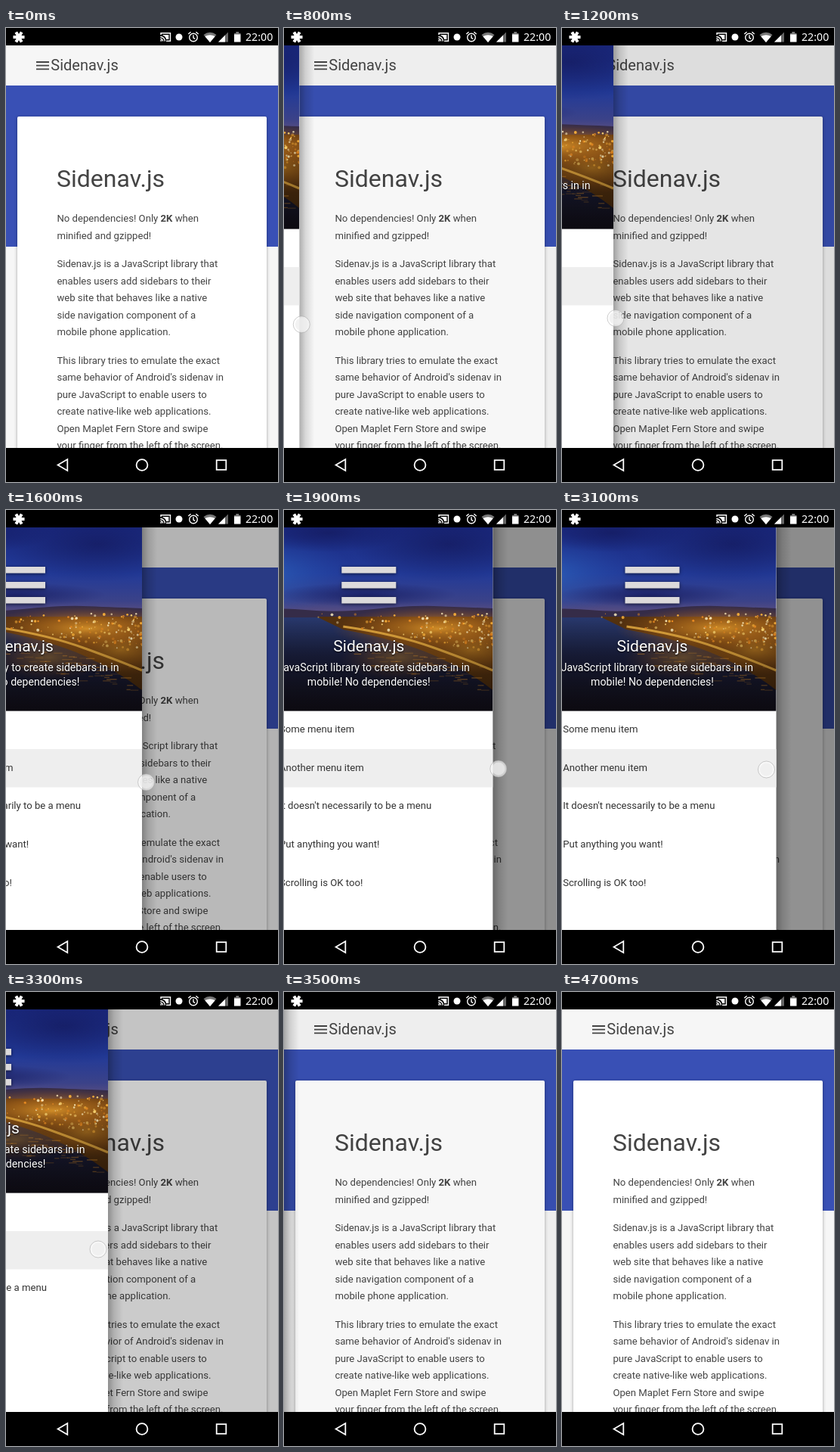
Recreate the animation shown at these times as an HTML page. Size 360 by 600 pixels, loop 5000 ms.

```html
<!DOCTYPE html>
<html lang="en">
<head>
<meta charset="utf-8">
<title>Sidenav.js</title>
<style>
  html, body { margin: 0; width: 100%; height: 100%; overflow: hidden; background: #000; }
  svg { display: block; }
  text { font: 13.15px Roboto, sans-serif; fill: #444; }
  .title { font-size: 20px; }
  .h1 { font-size: 32px; }
  .menu text { fill: #333; }
  .hero text { fill: #fff; font-size: 14.15px; text-anchor: middle; text-shadow: 0 1px 2px rgba(0,0,0,.8); }
  .hero .name { font-size: 21px; }
  .bars { fill: #dcdadb; filter: drop-shadow(0 1px 2px rgba(0,0,0,.6)); }
  .clock { font: 500 14.2px "Noto Sans", "Open Sans", sans-serif; fill: #fff; }
  .line { fill: none; stroke: #fff; }
</style>
</head>
<body>
<svg width="360" height="600" viewBox="0 0 360 600">
  <defs>
    <linearGradient id="sky" x1="0" y1="0" x2="0" y2="1">
      <stop offset="0" stop-color="#1a2a82"/>
      <stop offset=".5" stop-color="#223a98"/>
      <stop offset=".8" stop-color="#3b4288"/>
      <stop offset="1" stop-color="#6d567c"/>
    </linearGradient>
    <radialGradient id="glow">
      <stop offset="0" stop-color="#2f6cc4" stop-opacity=".75"/>
      <stop offset="1" stop-color="#2650b0" stop-opacity="0"/>
    </radialGradient>
    <radialGradient id="night">
      <stop offset="0" stop-color="#141a5e" stop-opacity=".75"/>
      <stop offset="1" stop-color="#141a5e" stop-opacity="0"/>
    </radialGradient>
    <radialGradient id="warm">
      <stop offset="0" stop-color="#f2a52e" stop-opacity=".85"/>
      <stop offset=".5" stop-color="#c8781e" stop-opacity=".5"/>
      <stop offset="1" stop-color="#9a5418" stop-opacity="0"/>
    </radialGradient>
    <linearGradient id="sea" x1="0" y1="0" x2="0" y2="1">
      <stop offset="0" stop-color="#28386c"/>
      <stop offset=".4" stop-color="#1b2040"/>
      <stop offset="1" stop-color="#181420"/>
    </linearGradient>
    <linearGradient id="dim" x1="0" y1="0" x2="0" y2="1">
      <stop offset=".5" stop-opacity="0"/>
      <stop offset="1" stop-opacity=".5"/>
    </linearGradient>
    <linearGradient id="edge">
      <stop offset="0" stop-opacity=".3"/>
      <stop offset=".4" stop-opacity=".13"/>
      <stop offset="1" stop-opacity="0"/>
    </linearGradient>
    <clipPath id="heroClip"><rect y="23" width="328" height="242.4"/></clipPath>
  </defs>

  <!-- page -->
  <rect y="23" width="360" height="532" fill="#f6f6f6"/>
  <rect y="76" width="360" height="213" fill="#3950b5"/>
  <path d="M40 45h17M40 49.7h17M40 54.4h17" stroke="#444" stroke-width="1.8"/>
  <text class="title" x="59.3" y="56">Sidenav.js</text>
  <rect x="15" y="117" width="330" height="460" rx="2" fill="#fff"
        style="filter:drop-shadow(0 1px 2px rgba(0,0,0,.35))"/>
  <text class="h1" x="67" y="210">Sidenav.js</text>
  <g id="copy"></g>
  <rect id="shade" y="23" width="360" height="532" opacity="0"/>

  <!-- drawer, resting fully open -->
  <g id="drawer">
    <rect x="328" y="23" width="20" height="532" fill="url(#edge)"/>
    <rect y="23" width="328" height="532" fill="#fff"/>
    <g class="hero" clip-path="url(#heroClip)">
      <rect y="23" width="328" height="122" fill="url(#sky)"/>
      <ellipse cx="15" cy="85" rx="130" ry="55" fill="url(#glow)"/>
      <ellipse cx="270" cy="45" rx="130" ry="50" fill="url(#night)"/>
      <ellipse cx="110" cy="30" rx="100" ry="26" fill="url(#night)"/>
      <ellipse cx="160" cy="112" rx="120" ry="16" fill="url(#night)"/>
      <path d="M0 134Q40 128 80 132T170 131T250 127T328 130V170H0Z" fill="#352c48"/>
      <rect y="142" width="328" height="124" fill="url(#sea)"/>
      <path d="M95 141H328V238Q295 212 250 192T130 158Z" fill="#53310f"/>
      <ellipse cx="255" cy="157" rx="140" ry="30" fill="url(#warm)"/>
      <ellipse cx="300" cy="185" rx="80" ry="34" fill="url(#warm)" opacity=".6"/>
      <ellipse cx="205" cy="195" rx="80" ry="30" fill="url(#warm)" opacity=".5"/>
      <path d="M130 154Q200 164 250 182T328 212" fill="none" stroke="#ffc24a" stroke-width="3" opacity=".75"/>
      <g id="lights"></g>
      <rect y="23" width="328" height="243" fill="url(#dim)"/>
      <path class="bars" d="M128 75h72v8.5h-72zM128 95h72v8.5h-72zM128 115h72v8.5h-72z"/>
      <text class="name" x="164" y="187.4">Sidenav.js</text>
      <text x="164" y="213.4">A JavaScript library to create sidebars in in</text>
      <text x="164" y="232.4">mobile! No dependencies!</text>
    </g>
    <rect y="316" width="328" height="50.5" fill="#eee"/>
    <g class="menu" fill="#333">
      <path transform="translate(13 278)" d="M12 2C6.48 2 2 6.48 2 12s4.48 10 10 10 10-4.48 10-10S17.52 2 12 2zm0 3c1.66 0 3 1.34 3 3s-1.34 3-3 3-3-1.34-3-3 1.34-3 3-3zm0 14.2c-2.5 0-4.71-1.28-6-3.22.03-1.99 4-3.08 6-3.08 1.99 0 5.97 1.09 6 3.08-1.29 1.94-3.5 3.22-6 3.22z"/>
      <rect x="16" y="332" width="18" height="18"/>
      <g transform="translate(13 379.5)">
        <circle cx="9" cy="13" r="1.25"/><circle cx="15" cy="13" r="1.25"/>
        <circle cx="12" cy="12" r="9" fill="none" stroke="#333" stroke-width="2"/>
        <path d="M3.5 11.3C6.4 10 8.3 8.2 9.26 5.77 11.07 8.33 14.05 10 17.42 10L20.5 9.6 18 5 12 2.5 6 5Z"/>
      </g>
      <path transform="translate(13 430.5)" d="M12 2C8.13 2 5 5.13 5 9c0 5.25 7 13 7 13s7-7.75 7-13c0-3.87-3.13-7-7-7zm0 9.5c-1.38 0-2.5-1.12-2.5-2.5s1.12-2.5 2.5-2.5 2.5 1.12 2.5 2.5-1.12 2.5-2.5 2.5z"/>
      <path transform="translate(13 481)" d="M21 16v-2l-8-5V3.5c0-.83-.67-1.5-1.5-1.5S10 2.67 10 3.5V9l-8 5v2l8-2.5V19l-2 1.5V22l3.5-1 3.5 1v-1.5L13 19v-5.5l8 2.5z"/>
      <text x="45.7" y="294">Some menu item</text>
      <text x="45.7" y="345">Another menu item</text>
      <text x="45.7" y="395.4">It doesn't necessarily to be a menu</text>
      <text x="45.7" y="446.2">Put anything you want!</text>
      <text x="45.7" y="496.6">Scrolling is OK too!</text>
    </g>
  </g>

  <g id="touch" visibility="hidden">
    <circle r="11" fill="#fff" fill-opacity=".6" stroke="#999" stroke-opacity=".5"/>
    <circle r="8.5" fill="#ececec" fill-opacity=".7"/>
  </g>

  <!-- status bar -->
  <rect width="360" height="23"/>
  <path id="star" class="line" stroke-width="4" d="M9.5 12H24.5M13.3 5.5L20.7 18.5M20.7 5.5L13.3 18.5"/>
  <g class="line" stroke-width="1.4">
    <path d="M205 9V6.7H217.5V17.3H212M204.3 11.5A6 6 0 0 1 210.3 17.6M204.3 14.3A3.3 3.3 0 0 1 207.6 17.6"/>
    <circle cx="248" cy="12.5" r="5.3"/>
    <path d="M248 9.3V13L250.3 14.4M241.3 8L244.6 5.2M254.7 8L251.4 5.2"/>
  </g>
  <path d="M207.5 9H215.3V15H212.2Q211 10.8 207.5 9.8Z" fill="#fff"/>
  <circle cx="229" cy="12" r="4.5" fill="#fff"/>
  <circle cx="205.2" cy="16.8" r="1" fill="#fff"/>
  <path d="M261.5 9Q270 2.5 278.5 9L270 19Z" fill="#777"/>
  <path d="M263.3 11Q270 7.5 276.7 11L270 19Z" fill="#fff"/>
  <path d="M281 18.5L294 5.5V18.5Z" fill="#666"/>
  <path d="M281 18.5L290 9.5V18.5Z" fill="#fff"/>
  <path d="M302 7H304.3V5H308.2V7H310.5V9H302Z" fill="#777"/>
  <path d="M302 8.5H310.5V18.5H302Z" fill="#fff"/>
  <text class="clock" x="317" y="17">22:00</text>

  <!-- navigation bar -->
  <rect y="555" width="360" height="45"/>
  <g class="line" stroke-width="1.8">
    <path d="M68.6 577.5L81.3 570V585Z"/>
    <circle cx="180" cy="577.5" r="7.4"/>
    <rect x="278.7" y="571.2" width="12.6" height="12.6"/>
  </g>
</svg>
<script>
const NS = 'http://www.w3.org/2000/svg';
const LOOP = 5000, STEP = 100, WIDTH = 328;
const $ = id => document.getElementById(id);

function add(parent, tag, attrs) {
  const el = document.createElementNS(NS, tag);
  for (const k in attrs) el.setAttribute(k, attrs[k]);
  return parent.appendChild(el);
}

const paragraphs = [
  ['No dependencies! Only <tspan font-weight="700">2K</tspan> when', 'minified and gzipped!'],
  ['Sidenav.js is a JavaScript library that', 'enables users add sidebars to their',
   'web site that behaves like a native', 'side navigation component of a',
   'mobile phone application.'],
  ['This library tries to emulate the exact', "same behavior of Android's sidenav in",
   'pure JavaScript to enable users to', 'create native-like web applications.',
   'Open Maplet Fern Store and swipe', 'your finger from the left of the screen.']
];
let y = 256;
for (const lines of paragraphs) {
  for (const line of lines) {
    add($('copy'), 'text', { x: 67.4, y }).innerHTML = line;
    y += 22.5;
  }
  y += 15.1;
}

// city lights along the shore and their streaks on the water
let seed = 11;
const rnd = () => (seed = seed * 16807 % 2147483647) / 2147483647;
const colors = ['#ffd873', '#ffb53a', '#e88a22', '#fff0c0'];
for (let i = 0; i < 150; i++) {
  const u = Math.sqrt(rnd());
  add($('lights'), 'circle', {
    cx: 95 + u * 233, cy: 137 + rnd() * (10 + u * 42), r: .6 + rnd() * 1.4,
    fill: colors[i % 4], opacity: .4 + rnd() * .6
  });
}
for (let i = 0; i < 70; i++) {
  const u = rnd();
  add($('lights'), 'rect', {
    x: 135 + u * 180, y: 165 + u * 42 + rnd() * 36, width: 4 + rnd() * 10, height: 1.4,
    fill: '#dc9030', opacity: .15 + rnd() * .4
  });
}

// [time, value] pairs
const edgeKeys = [[400, -20], [500, 3], [900, 26], [1200, 68], [1600, 180], [1900, 276.3],
  [2100, 318], [2300, 327], [2500, 328], [2700, 328], [2800, 325], [3000, 301], [3100, 283.5],
  [3200, 228], [3300, 135], [3400, 44], [3500, 0], [3700, -20]];
const offsetKeys = [[500, 3], [1200, 3], [1900, 7.5], [2400, 3], [2500, -13]];
const heightKeys = [[500, 398], [1200, 383.5], [1900, 342], [2400, 340], [2800, 345], [3100, 343], [3300, 340]];

function at(keys, t) {
  if (t <= keys[0][0]) return keys[0][1];
  for (let i = 1; i < keys.length; i++) {
    const [t0, a] = keys[i - 1], [t1, b] = keys[i];
    if (t < t1) return a + (b - a) * (t - t0) / (t1 - t0);
  }
  return keys[keys.length - 1][1];
}

const show = (el, on) => el.setAttribute('visibility', on ? 'visible' : 'hidden');

function draw(now) {
  const t = Math.floor(now % LOOP / STEP) * STEP;
  const edge = at(edgeKeys, t);
  // the shade fades out slightly behind the closing drawer
  const lag = t >= 3400 && t < 3700 ? (3700 - t) * .00015 : 0;
  $('drawer').setAttribute('transform', `translate(${edge - WIDTH} 0)`);
  $('shade').setAttribute('opacity', Math.max(0, edge / WIDTH * .5, lag));
  $('touch').setAttribute('transform', `translate(${edge + at(offsetKeys, t)} ${at(heightKeys, t)})`);
  show($('touch'), t >= 500 && t < 2500 || t >= 2800 && t < 3400);
  show($('star'), t < 4700);
}

const start = performance.now();
function tick() {
  draw(performance.now() - start);
  requestAnimationFrame(tick);
}
tick();
</script>
</body>
</html>
```
